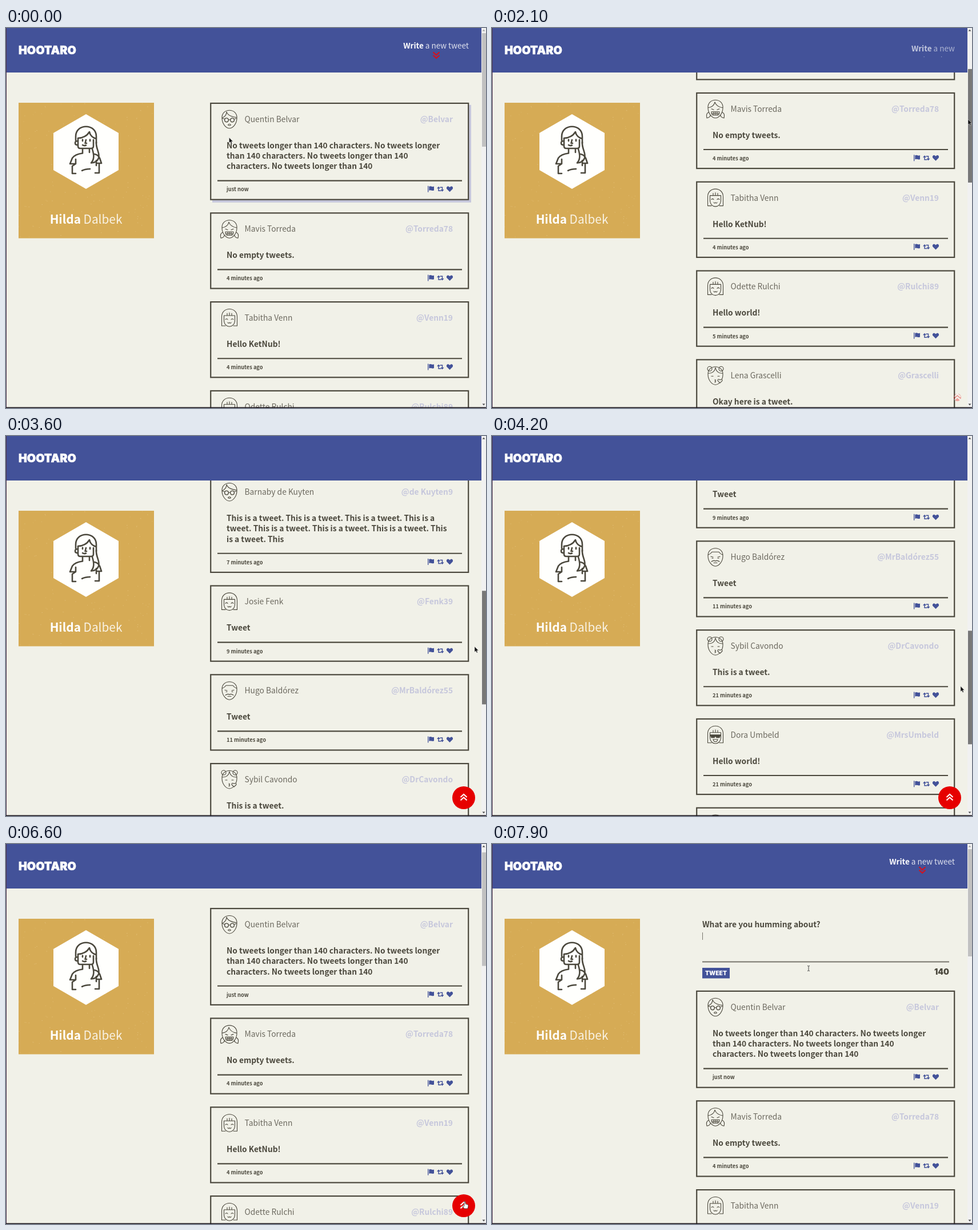
These frames come from a looping animation (840x666 px, 8000 ms). An HTML page:

```html
<!DOCTYPE html>
<html lang="en">
<head>
<meta charset="utf-8">
<title>Feed</title>
<style>
  html, body { margin: 0; width: 100%; height: 100%; overflow: hidden; background: #f1f1e8; }
  #stage { display: block; width: 840px; height: 666px; cursor: none; }
  text, #write { font-family: "Noto Sans CJK JP", "Noto Sans CJK SC", "Noto Sans CJK", "Open Sans", sans-serif; font-size: 13.75px; }
  text { fill: #4b483d; white-space: pre; }
  .bold { font-weight: 600; }
  .light { font-weight: 300; fill-opacity: .85; }
  .name { font-weight: 300; font-size: 13.8px; fill: #6c695f; }
  .handle { font-weight: 600; fill: #c6c7dc; text-anchor: end; }
  .time { font-weight: 600; font-size: 9.25px; }
  .block { font-family: Inter, "DejaVu Sans", sans-serif; font-weight: 900; }
  .line { fill: none; stroke: #4b483d; stroke-linecap: round; stroke-linejoin: round; }
  .chevrons { fill: none; stroke-width: 2.1; }
  #write { overflow: hidden; }
  #write div { color: #dfe2ee; font-size: 13.5px; line-height: 18.3px; text-align: center; font-weight: 300; }
  #write b { color: #fff; }
  #write svg { display: block; margin: 0 auto; overflow: visible; }
</style>
</head>
<body>
<svg id="stage" viewBox="0 0 840 666">
  <defs>
    <clipPath id="reveal"><rect id="revealBox" x="350" y="131" width="470" height="0"/></clipPath>
  </defs>
  <rect width="840" height="666" fill="#f1f1e8"/>
  <g id="profile"></g>
  <g id="compose" clip-path="url(#reveal)">
    <text class="bold" x="368" y="145.5">What are you humming about?</text>
    <path id="caret" d="M368.5 155v13" stroke="#77756c"/>
    <path d="M368 206.5h432" stroke="#77756c" stroke-width="2"/>
    <rect x="368" y="217" width="48" height="18.5" fill="#435299"/>
    <text class="block" x="392" y="229.7" text-anchor="middle" style="font-size:10.3px;fill:#fff">TWEET</text>
    <text class="block" x="800" y="229" text-anchor="end" style="font-size:14px">140</text>
  </g>
  <g id="feed"></g>
  <rect width="832" height="78" fill="#435299"/>
  <text class="block" x="22" y="46.3" style="font-size:19.8px;fill:#fff;stroke:#fff;stroke-width:.6">HOOTARO</text>
  <foreignObject id="write">
    <div id="label"><b class="bold">Write</b> a new tweet</div>
    <svg width="16" height="16" viewBox="-8 -8 16 16"><path id="bounce" class="chevrons" stroke="#d3121f" d="M-5.5-5.5L0-.5L5.5-5.5M-5.5 0L0 5L5.5 0"/></svg>
  </foreignObject>
  <g id="toTop">
    <circle fill="#e60000"/>
    <path class="chevrons" stroke="#fff" d="M-5.5-1L0-6L5.5-1M-5.5 4.5L0-.5L5.5 4.5"/>
  </g>
  <rect x="832" width="8" height="666" fill="#f1f1f1"/>
  <path id="upArrow" d="M833.5 5.5l2.5-3l2.5 3z"/>
  <path d="M833.5 658.5l2.5 3l2.5-3z" fill="#505050"/>
  <rect id="thumb" x="833" width="7"/>
  <path d="M.5 0V666" stroke="#4a2f4c"/>
  <rect y="664.5" width="840" height="1.5" fill="#1d171f"/>
  <g id="cursor">
    <path d="M0 0V9.5L2.2 7.6L3.8 11L5.4 10.2L3.9 7H6.8z" fill="#111" stroke="#eee" stroke-width=".5"/>
    <path d="M-1 7V0Q0-1.5 1 0V4L5 5Q6.5 5.5 6 8L5 12H-1L-4 7.5Q-3.5 6-1 8z" fill="#fff" stroke="#333" stroke-width=".8"/>
    <path d="M-2-4.5Q0-4.5 0-3.5Q0-4.5 2-4.5M0-3.5V3.5M-2 4.5Q0 4.5 0 3.5Q0 4.5 2 4.5" fill="none" stroke="#444"/>
  </g>
</svg>
<script>
const $ = id => document.getElementById(id);
const set = (el, attrs) => { for (const k in attrs) el.setAttribute(k, attrs[k]); };
const text = (cls, x, y, str) => `<text class="${cls}" x="${x}" y="${y}">${str}</text>`;
const path = (d, width = 1.1, extra = '') => `<path class="line" d="${d}" stroke-width="${width}" ${extra}/>`;
const ring = (x, y, r) => `M${x - r} ${y}a${r} ${r} 0 1 0 ${2 * r} 0a${r} ${r} 0 1 0 ${-2 * r} 0`;

// Avatars, drawn around their own centre
const head = 'M-13-2C-14-20 14-20 13-2C13 8 6 16 0 16C-6 16-13 8-13-2z';
const bob = 'M-7 14H-13.5V-2C-13.5-20 13.5-20 13.5-2V14H7M-9.5-4H9.5V4C9.5 19-9.5 19-9.5 4zM-4-4V-8M0-4V-9M4-4V-8';
const shutEyes = 'M-7 3q2-2.5 4 0M3 3q2-2.5 4 0';
const faces = {
  specs: path(head + 'M-13-2C-8-4-5-8-5-13C-3-6 5-4 13-3M-1.5 1h3M-9-.5l-4-1M9-.5l4-1M-2.5 10q2.5-3 5 0q-2.5 2.5-5 0')
    + path(ring(-5, 1.5, 3.4) + ring(5, 1.5, 3.4), 1.4),
  grin: path(head + 'M-13-2C-6-3-2-7-1-12C1-6 6-3 13-2M-12 6q-5 2-3 10q6-1 6-5M12 6q5 2 3 10q-6-1-6-5M-7 0l4 1.5M7 0l-4 1.5')
    + path('M-7 5H7Q7 11 3 11H-3Q-7 11-7 5M-6 8H6M-3 5v6M0 5v6M3 5v6'),
  bob: path(bob + shutEyes + 'M-3 8q1.5 3 3 0q1.5 3 3 0'),
  kiss: path(head + ring(-10, -12, 4) + ring(10, -12, 4) + 'M-12-4C-5-4-1-8 0-14C1-8 5-4 12-4M-7 1h3M4 1h3M-1 7q3 1 0 2.5q3 1 0 2.5')
    + path('M8 13L4 9Q4 5 8 7.5Q12 5 12 9z', 1.1, 'style="fill:#f1f1e8"'),
  round: path(head + 'M-12.5-4Q-8-6-6-9H6Q8-6 12.5-4M-8-1l4 1M8-1l-4 1M-6 2h2M4 2h2M-7 8q4-3 7-1q3-2 7 1M-3 10h6'),
  shades: path(bob + 'M-4 8H4Q3 12 0 12Q-3 12-4 8')
    + path('M-9 0H9L7 5H2L0 2L-2 5H-7z', 1.1, 'style="fill:#4b483d"')
};

const posts = [
  ['specs', 'Quentin Belvar', 'Belvar', 'just now', 'No tweets longer than 140 characters. No tweets longer', 'than 140 characters. No tweets longer than 140', 'characters. No tweets longer than 140'],
  ['grin', 'Mavis Torreda', 'Torreda78', '4 minutes ago', 'No empty tweets.'],
  ['bob', 'Tabitha Venn', 'Venn19', '4 minutes ago', 'Hello KetNub!'],
  ['bob', 'Odette Rulchi', 'Rulchi89', '5 minutes ago', 'Hello world!'],
  ['kiss', 'Lena Grascelli', 'Grascelli', '5 minutes ago', 'Okay here is a tweet.'],
  ['specs', 'Barnaby de Kuyten', 'de Kuyten9', '7 minutes ago', 'This is a tweet. This is a tweet. This is a tweet. This is a', 'tweet. This is a tweet. This is a tweet. This is a tweet. This', 'is a tweet. This'],
  ['bob', 'Josie Fenk', 'Fenk39', '9 minutes ago', 'Tweet'],
  ['round', 'Hugo Baldórez', 'MrBaldórez55', '11 minutes ago', 'Tweet'],
  ['kiss', 'Sybil Cavondo', 'DrCavondo', '21 minutes ago', 'This is a tweet.'],
  ['shades', 'Dora Umbeld', 'MrsUmbeld', '21 minutes ago', 'Hello world!'],
  ['bob', 'Valdorges', 'vd', '25 minutes ago', 'Je pense , donc je suis']
];

const icons = `<g fill="#435299"><path d="M738-5.5h1.3V5.5H738zM740.3-4.5q2.5-1 4.5 0t4.2-.2V2.2q-2 1-4.2.2t-4.5.2z"/>
  <path d="M776.5 5L771.5 0C769.5-3 773-7 776.5-3C780-7 783.5-3 781.5 0z"/></g>
  <path d="M757-3V3H761.500M759.500-3H763.500V3" fill="none" stroke="#435299" stroke-width="1.5"/>
  <path d="M754-1l3-3.500l3 3.500zM760.500 1l3 3.500l3-3.500z" fill="#435299"/>`;

let nextTop = 130.8;
const cards = posts.map(([face, name, handle, time, ...lines]) => {
  const extra = (lines.length - 1) * 18.3, top = nextTop, height = 134.4 + extra, rule = 100.2 + extra;
  nextTop += height + 21.4;
  const el = document.createElementNS('http://www.w3.org/2000/svg', 'g');
  el.innerHTML = `<rect x="361" y="4" width="453" height="${height}" fill="#c6c7dc"/>
    <rect x="358.200" y="1.100" width="451" height="${height - 2.2}" fill="#f1f1e8" stroke="#4b483d" stroke-width="2.200"/>
    <g transform="translate(391 29)">${faces[face]}</g>`
    + text('name', 417.5, 34, name) + text('handle', 782, 34, '@' + handle)
    + lines.map((s, i) => text('bold', 386, 80 + i * 18.3, s)).join('')
    + path(`M370 ${rule}H798`, 2.1, 'style="stroke-linecap:butt"') + text('time', 386, rule + 18.9, time)
    + `<g transform="translate(0 ${rule + 14.7})">${icons}</g>`;
  $('feed').append(el);
  return { el, top, height, shadow: el.firstChild };
});

// Profile tile with seeded speckles
let seed = 7;
const rand = () => (seed = seed * 16807 % 2147483647) / 2147483647;
let specks = '';
for (let i = 0; i < 170; i++) specks += `M${(22 + rand() * 235).toFixed(1)} ${(132 + rand() * 235).toFixed(1)}h${(.5 + rand()).toFixed(1)}`;
$('profile').innerHTML = `<rect x="22" y="131" width="237" height="237.500" fill="#d6ab55"/>
  <path d="${specks}" stroke="#e3c07a" stroke-width=".9"/>
  <path d="M140 151L197 184V249L140 282L83 249V184z" fill="#fffffd"/>`
  // head, fringe, ear and face
  + path('M122 197V190C122 167 158 167 158 190V202M126 193V207Q126 211 130 211H149Q153 211 153 207V196M125 198Q121 198 121 201.500T125 205M126 193C134 193 142 189 146 182C147 188 152 193 158 194M134 195.500v2.500M147 195.500v2.500M140 196l-1.500 6h2.500M134 205q3 2 6 .5', 2.6)
  // shirt and arms
  + path('M134 212V219.500Q121 221 116 228L112 238H121M146 212V218M155 221Q161 222 164 228L167 237H158M122 230V238L116 242V255H122M158 232V241M163 239V254H156M133 250Q139 247 147 247', 2.6)
  // ponytail
  + path('M158 200C157 212 165 219 162 228C160 234 156 236 149 236.500C155 230 154 222 151 212', 2.6)
  + `<text x="140" y="343" text-anchor="middle" style="font-size:20.800px;fill:#fff"><tspan class="bold">Hilda</tspan><tspan class="light"> Dalbek</tspan></text>`;

// Timing
const swing = (t, start) => .5 - Math.cos(Math.PI * Math.min(1, Math.max(0, (t - start) / 400))) / 2;
function track(t, keys) {
  const i = keys.findIndex(k => k[0] > t);
  if (i < 0) return keys[keys.length - 1].slice(1);
  const a = keys[i - 1], b = keys[i], p = (t - a[0]) / (b[0] - a[0]);
  return a.slice(1).map((v, j) => v + (b[j + 1] - v) * p);
}
const scrollKeys = [[0, 0], [1500, 0], [1800, 60], [2100, 210], [2900, 511], [3600, 877], [4300, 1150], [4400, 1150], [4600, 1198]];
const mouseKeys = [[0, 390, 192], [500, 600, 165], [900, 800, 122], [1300, 834, 103], [1500, 834, 103], [1800, 833, 118],
  [2100, 833, 160], [2900, 835, 257], [3600, 820, 369], [4300, 820, 450], [4400, 820, 450], [4600, 819, 465], [4700, 818, 467],
  [4800, 806, 480], [5100, 791, 544], [5200, 791, 544], [5400, 801, 588], [5500, 801, 588], [5800, 803, 628],
  [6600, 803, 628], [7200, 752, 36], [7400, 752, 36], [7900, 554, 218]];

function draw(t) {
  const scroll = t < 6233 ? track(t, scrollKeys)[0] : 1198 * (1 - swing(t, 6233));
  const away = swing(t, 1945) - swing(t, 6650);
  const open = swing(t, 7350);
  const [x, y] = track(t, mouseKeys);
  const onButton = away > .9 && Math.hypot(x - 801, y - 634) < 20;

  for (const c of cards) {
    const top = c.top - scroll + 126 * open;
    const hover = !onButton && x > 358 && x < 810 && y > Math.max(78, top) && y < top + c.height;
    set(c.el, { transform: `translate(0 ${top})` });
    set(c.shadow, { visibility: hover ? 'visible' : 'hidden' });
  }
  set($('revealBox'), { height: 126 * open });
  set($('caret'), { visibility: t > 7700 ? 'visible' : 'hidden' });

  const w = 117 * (1 - away), h = 36 * (1 - away);
  set($('write'), { x: 811 - w, y: 38.5 - h / 2, width: w, height: h, opacity: 1 - away });
  $('label').style.whiteSpace = away > 0 ? 'normal' : 'nowrap';
  set($('bounce'), { transform: `translate(0 ${-2.3 + 4 * Math.sin(t * Math.PI / 500 + .9)})` });

  const r = 20 * away;
  set($('toTop'), { transform: `translate(${821 - r} ${654 - r})`, opacity: away });
  set($('toTop').firstElementChild, { r });

  const shade = t > 1400 && t < 4650 ? '#787878' : x > 832 ? '#a8a8a8' : '#c1c1c1';
  set($('thumb'), { y: 9 + scroll * .299, height: 199 - 11 * open, fill: shade });
  set($('upArrow'), { fill: scroll > 0 ? '#505050' : '#a3a3a3' });

  const onWrite = away < .1 && x > 694 && x < 811 && y > 21 && y < 57;
  const onInput = open > .5 && x > 368 && x < 800 && y > 131 && y < 236;
  const shape = onButton || onWrite ? 1 : onInput ? 2 : 0;
  set($('cursor'), { transform: `translate(${x} ${y})` });
  [...$('cursor').children].forEach((el, i) => set(el, { visibility: i === shape ? 'visible' : 'hidden' }));
}

function loop() {
  draw(performance.now() % 8000);
  requestAnimationFrame(loop);
}
loop();
</script>
</body>
</html>
```
